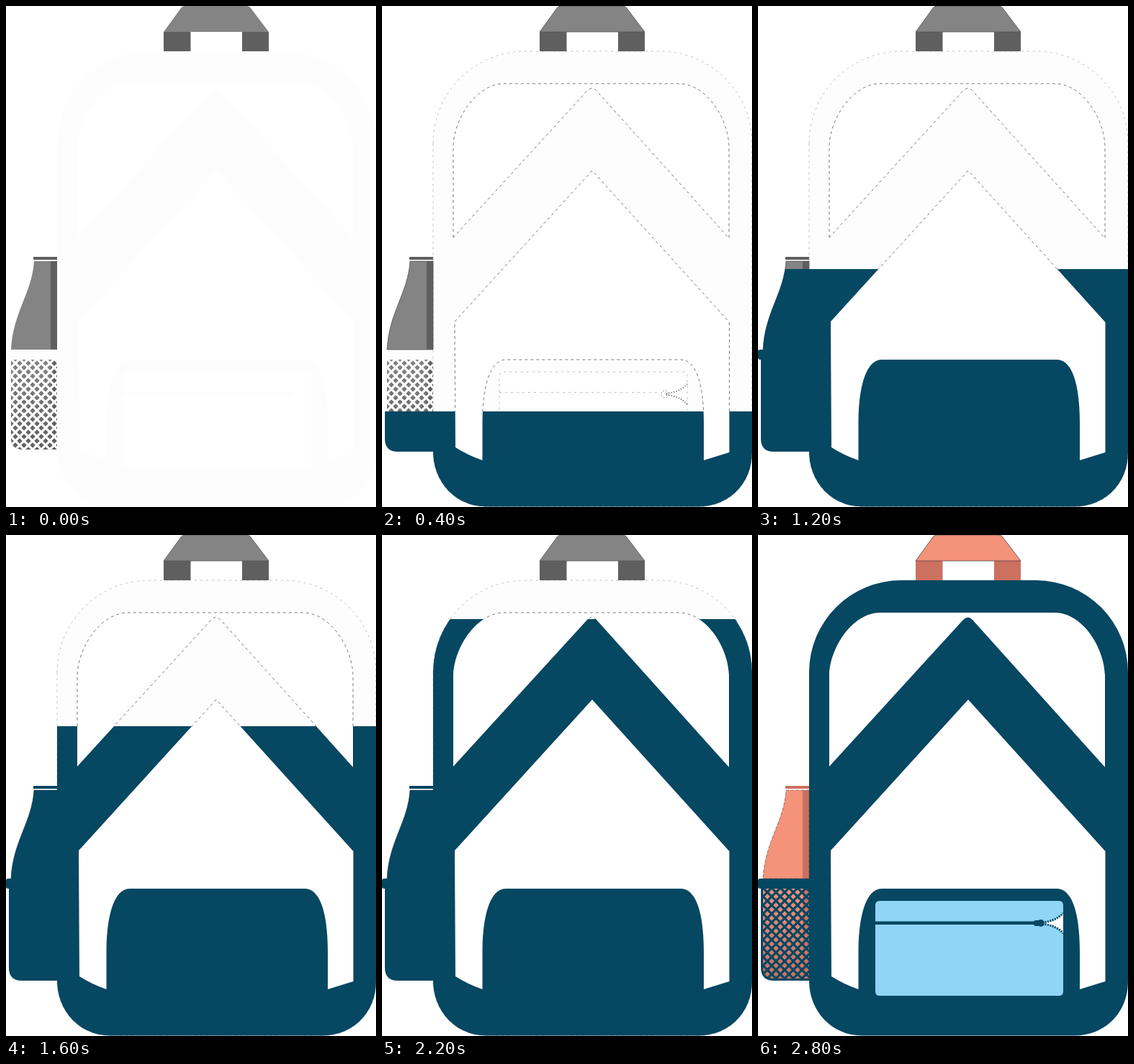
Animation, 514 px wide and 697 px high, one loop 3000 ms. Source, as an HTML page:

```html
<!DOCTYPE html>
<html lang="en">
<head>
<meta charset="utf-8">
<title>Backpack filling up</title>
<style>
  html, body { margin: 0; width: 100%; height: 100%; overflow: hidden; background: #fff; }
  svg { display: block; width: 100%; height: 100%; }
</style>
</head>
<body>
<svg id="stage" viewBox="0 0 514 697"></svg>
<script>
const LOOP = 3000, STEP = 200;
const BLUE = '#064762';

const shapes = {
  bag: 'M71 191A128 128 0 0 1 199 63H387A128 128 0 0 1 514 191V622C514 663 483 696.5 440 696.5H145C103 696.5 71 663 71 620Z',
  upper: 'M99 322V195C100 157 131 108 170 108H412C451 108 481 157 482 195V323L298 118Q292 111 285 118Z',
  lower: 'M101 439L292 229L482.5 440V621L447 632V580C447 525 436 492 415 492H172C150 492 139.5 530 139.5 580V632Q119 625 102 614Z',
  grip: 'M219 36L243 3Q245 0 249 0H334Q338 0 340 3L365 36Z',
  legs: 'M219 36H256.5V63H219ZM328 36H365V63H328Z',
  bottle: 'M71 355H39C36 400 10 425 7 478H71Z',
  pouch: 'M4 491H71V620H22Q4 620 4 602Z',
  meshArea: 'M7 491H71V617H23Q7 617 7 601Z',
  panel: 'M169 509H418Q424 509 424 515V635Q424 641 418 641H169Q163 641 163 635V515Q163 509 169 509Z',
  zipLine: 'M163 537.5H385',
  zipMouth: 'M395 540Q414 538 424 526V554Q414 542 395 540Z',
  teeth: 'M395 539Q414 537 424 526M395 541Q414 543 424 554'
};

const path = (name, fill, extra = '') => `<path d="${shapes[name]}" fill="${fill}" ${extra}/>`;
const rect = (x, y, w, h, fill) => `<rect x="${x}" y="${y}" width="${w}" height="${h}" fill="${fill}"/>`;
const outline = (names, extra) => `<g fill="none" ${extra}>${names.map(name => path(name, 'none')).join('')}</g>`;

function artwork(id, { frame, light, dark, panel, mouth, solid }) {
  const mesh = solid ? '' : `
    <defs>
      <linearGradient id="${id}Shade" x2="0" y2="1">
        <stop stop-color="${light}"/><stop offset="1" stop-color="${dark}"/>
      </linearGradient>
      <pattern id="${id}Net" width="12" height="12" x="7" y="491" patternUnits="userSpaceOnUse">
        <path d="M-3 -3L15 15M-3 15L15 -3" stroke="${frame}" stroke-width="3.2"/>
      </pattern>
    </defs>
    ${path('meshArea', `url(#${id}Shade)`)}${rect(62, 491, 9, 126, dark)}${path('meshArea', `url(#${id}Net)`)}`;
  return path('grip', light) + path('legs', dark)
    + path('bottle', light) + rect(62, 355, 9, 123, dark) + rect(38, 349, 33, 4, dark)
    + path('pouch', frame) + mesh
    + `<rect y="478" width="74" height="14" rx="3" fill="${frame}"/>`
    + path('bag', frame) + path('upper', '#fff') + path('lower', '#fff')
    + path('panel', panel) + rect(163, 537.5, 224, 4.5, frame)
    + path('zipMouth', mouth)
    + path('teeth', 'none', `stroke="${frame}" stroke-width="3" stroke-dasharray="2 1.5"`)
    + `<rect x="383" y="536" width="9" height="8" rx="3" fill="${frame}"/><circle cx="393" cy="540" r="5" fill="${frame}"/>`;
}

// Thin broken contours that show on the empty bag
const contours =
  outline(['bag', 'panel', 'zipLine'], 'stroke="#667" stroke-width=".6" stroke-dasharray="3 5" opacity=".7"')
  + outline(['upper', 'lower'], 'stroke="#234" stroke-width=".8" stroke-dasharray="4 4" opacity=".8"')
  + outline(['grip', 'bottle'], 'stroke="#555" stroke-width=".8"')
  + outline(['teeth'], 'stroke="#555" stroke-width="2" stroke-dasharray="1 2.5"')
  + '<circle cx="393" cy="540" r="5" fill="none" stroke="#667" stroke-width=".7" stroke-dasharray="2 2"/>';

const stage = document.getElementById('stage');
stage.innerHTML = `
  <clipPath id="level"><rect id="fill" width="514" height="697"/></clipPath>
  <g id="empty">
    ${artwork('empty', { frame: '#fdfdfd', light: '#848484', dark: '#5f5f5f', panel: '#fff', mouth: '#fff' })}
    <g id="contours">${contours}</g>
  </g>
  <g id="silhouette" clip-path="url(#level)">
    ${artwork('solid', { frame: BLUE, light: BLUE, dark: BLUE, panel: BLUE, mouth: BLUE, solid: true })}
  </g>
  <g id="full">
    ${artwork('full', { frame: BLUE, light: '#f4927a', dark: '#cc705f', panel: '#90d5f5', mouth: '#fff' })}
    ${outline(['grip'], 'stroke="#543f42" stroke-width=".8"')}
    ${outline(['bottle'], 'stroke="#543f42" stroke-width=".6" stroke-dasharray="5 2"')}
  </g>`;

const find = id => document.getElementById(id);
const show = (id, visible) => find(id).setAttribute('display', visible ? 'inline' : 'none');

function draw() {
  const step = Math.floor((performance.now() % LOOP) / STEP);
  const finished = step >= 14;
  show('empty', !finished);
  show('contours', step > 0);
  show('silhouette', step > 0 && !finished);
  show('full', finished);
  find('fill').setAttribute('y', Math.round(663.8 - 49.7 * step));
  requestAnimationFrame(draw);
}

draw();
</script>
</body>
</html>
```
